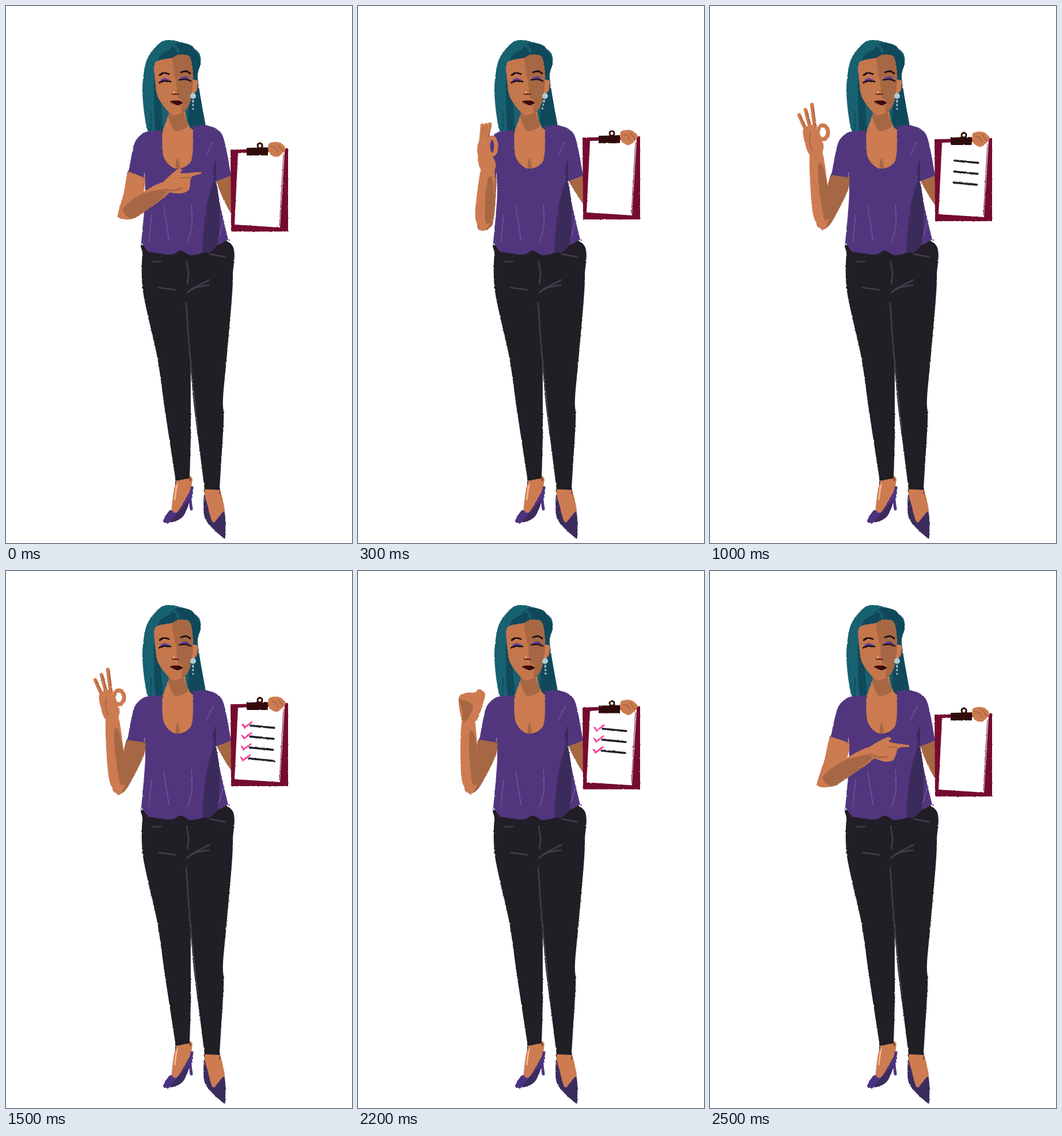
An HTML page that plays this animation: 601 px wide and 931 px high, repeating every 3 s.

```html
<!DOCTYPE html>
<html lang="en">
<head>
<meta charset="utf-8">
<title>Checklist</title>
<style>
html, body { margin: 0; width: 100%; height: 100%; overflow: hidden; background: #fff; }
svg { display: block; width: 100%; height: 100%; }
</style>
</head>
<body>
<svg viewBox="0 0 601 931" xmlns="http://www.w3.org/2000/svg">
  <defs>
    <filter id="crayon" filterUnits="userSpaceOnUse" x="0" y="0" width="601" height="931" color-interpolation-filters="sRGB">
      <feTurbulence type="fractalNoise" baseFrequency=".3" numOctaves="1" seed="4"/>
      <feDisplacementMap in="SourceGraphic" scale="2.6" xChannelSelector="R" yChannelSelector="G"/>
    </filter>
  </defs>
  <g id="figure" filter="url(#crayon)" stroke-linecap="round" stroke-linejoin="round"></g>
</svg>
<script>
const C = {
  skin: '#cd7b51', face: '#c4764c', shade: '#a66744', shirt: '#51367e', shirtDark: '#3b2b5b', fold: '#6d539f',
  jeans: '#211e25', seam: '#403e4a', hair: '#176170', hairDark: '#10495a', lips: '#3a0d0d', ink: '#1a1014',
  lid: '#5d3d9c', pearl: '#a8cdd6', board: '#750c30', clip: '#310b09', tick: '#f83b9c', line: '#20222a',
  shoe: '#4b3380', shoeDark: '#3c2c5d', glow: '#efb693'
};
const figure = document.getElementById('figure');

function add(parent, tag, attrs = {}) {
  const el = document.createElementNS('http://www.w3.org/2000/svg', tag);
  for (const k in attrs) el.setAttribute(k, attrs[k]);
  parent.appendChild(el);
  return el;
}

// Smooth curve through every given point
function curve(pts, closed) {
  const p = typeof pts === 'string' ? pts.trim().split(/\s+/).map(s => s.split(',').map(Number)) : pts;
  const n = p.length;
  const at = i => closed ? p[(i + n) % n] : p[Math.max(0, Math.min(n - 1, i))];
  const lean = (u, v, w, s) => [0, 1].map(k => (u[k] + s * (w[k] - v[k]) / 7).toFixed(1));
  let d = 'M' + p[0];
  for (let i = 0; i < (closed ? n : n - 1); i++) {
    const [a, b, c, e] = [at(i - 1), at(i), at(i + 1), at(i + 2)];
    d += 'C' + [lean(b, a, c, 1), lean(c, b, e, -1), c].join(' ');
  }
  return closed ? d + 'Z' : d;
}
const group = (g, x = 0, y = 0) => add(g, 'g', { transform: `translate(${x} ${y})` });
const shape = (g, pts, fill) => add(g, 'path', { d: curve(pts, true), fill });
const poly = (g, points, fill) => add(g, 'polygon', { points, fill });
const stroke = (g, pts, color, width) =>
  add(g, 'path', { d: curve(pts), fill: 'none', stroke: color, 'stroke-width': width });
const dot = (g, cx, cy, r, fill) => add(g, 'circle', { cx, cy, r, fill });
const ring = (g, cx, cy, rx, ry, color, width) =>
  add(g, 'ellipse', { cx, cy, rx, ry, fill: 'none', stroke: color, 'stroke-width': width });
const show = (el, on) => el.setAttribute('display', on ? 'inline' : 'none');

const clamp = (n, top = 1) => Math.max(0, Math.min(top, n));
const ease = p => p * p * (3 - 2 * p);
const mix = (a, b, p) => a + (b - a) * p;

function drawLegs(g) {
  shape(g, '297,820 323,817 317,851 306,873 288,878', C.skin);
  stroke(g, '297,828 293,855', C.glow, 3);
  stroke(g, '323,835 320,855 322,872', C.shoe, 5);
  shape(g, '325,833 308,884 283,896 273,893 285,874 298,877', C.shoe);
  shape(g, '318,858 308,884 286,895 297,879', C.shoeDark);
  shape(g, '345,836 370,837 380,882 362,897 349,870', C.skin);
  shape(g, '344,846 346,889 376,921 381,918 379,877 360,895 349,862', C.shoeDark);
  shape(g, `246,412 237,430 238,495 263,610 276,700 295,823 295,823 319,819 319,819 321,740 321,613
    325,680 337,775 345,838 345,838 371,839 371,839 378,720 377,680 386,580 394,470 384,408`, C.jeans);
  ['314,443 317,465 315,481', '264,488 294,492', '315,497 330,488 352,484', '320,492 353,475', '354,430 380,435',
    '254,444 269,443', '313,515 319,600 328,690 333,735'].forEach(p => stroke(g, p, C.seam, 2.6));
}

function drawChest(g) {
  shape(g, '273,165 268,245 276,280 298,288 322,280 329,240 319,165', C.skin);
  shape(g, '272,172 318,165 309,186 316,208 293,216 279,186', C.shade);
  shape(g, '298,263 302,281 294,281', C.shade);
}

function drawShirt(g) {
  shape(g, `246,219 271,215 271,215 274,262 295,282 322,268 325,208 325,208 350,207 376,224 391,294 391,294
    365,304 365,304 374,355 386,405 386,405 348,425 322,432 303,424 286,431 247,426 247,426 235,411 235,411
    242,320 237,235`, C.shirt);
  shape(g, '365,268 359,285 361,300 349,345 342,424 367,414 371,350 365,304', C.shirtDark);
  ['359,236 349,257', '253,362 248,408', '274,347 283,405', '322,345 323,378 316,408', '377,376 370,402']
    .forEach(p => stroke(g, p, C.fold, 1.6));
}

// turn: 0 faces the viewer, 1 looks aside
function drawHead(g, turn) {
  shape(g, `247,218 237,150 244,95 266,65 283,59 311,65 335,81 338,100 333,126 347,209 347,209 318,207 300,150
    272,217 272,217`, C.hair);
  shape(g, '297,64 324,70 338,97 333,126 347,209 347,209 318,207 318,100 283,82', C.hairDark);
  shape(g, '294,73 266,88 257,130 260,216 272,217 268,120 298,86', C.hairDark);
  stroke(g, '299,79 294,70 280,70 269,81', C.hair, 4);
  stroke(g, '252,186 251,216', C.hairDark, 1.5);
  const beads = group(g, turn * 4, turn * 2);
  const face = group(g, turn * 4, -turn);
  if (!turn) shape(face, '323,130 333,130 331,146 323,154', C.skin);
  shape(face, '260,97 290,90 318,87 325,125 318,172 298,188 285,186 264,158 258,120', C.face);
  shape(face, `${mix(290, 297, turn)},90 318,87 325,125 318,172 305,184 307,166 298,157 ${mix(296, 302, turn)},134`, C.shade);
  shape(face, '283,181 294,184 305,182 298,188', turn ? C.shade : C.skin);
  drawEye(group(face, 266, 118), 1);
  drawEye(group(face, 321, 115), -1);
  const middle = group(face, turn * 5, turn);
  stroke(middle, '289,153 300,153', '#5a2a1c', 2);
  dot(middle, 292, 150, 1.6, C.glow);
  shape(middle, '285,166 291,164 301,164 307,168 298,172', C.lips);
  const pendant = group(beads);
  if (!turn) dot(pendant, 325, 156, 5, C.pearl);
  for (let i = 0; i < 3; i++) stroke(pendant, `325,${164 + i * 7} 325,${166 + i * 6}`, C.pearl, 3.2);
  if (!turn) g.appendChild(beads);
  return pendant;
}

// Starts at the outer corner; side mirrors it
function drawEye(g, side) {
  const x = n => n * side;
  stroke(g, `${x(1)},2 ${x(8)},-2 ${x(17)},0`, C.ink, 2.8);
  shape(g, `${x(2)},12 ${x(9)},7 ${x(19)},11`, C.lid);
  stroke(g, `${x(0)},15 ${x(9)},12 ${x(20)},13`, C.ink, 2.6);
}

function drawBoard(g) {
  poly(g, '390,231 490,229 490,373 391,373', C.board);
  poly(g, '403,237 484,234 476,366 397,361', '#fff');
  stroke(g, '482,240 475,363', C.board, 1);
  stroke(g, '399,362 476,367', C.board, 1);
  poly(g, '418,228 455,227 455,241 418,241', C.clip);
  ring(g, 441, 224, 4, 4, C.clip, 3);
  shape(g, '456,222 464,218 476,219 486,230 471,244 457,237', C.skin);
  stroke(g, '461,226 468,228 473,236', C.shade, 2);
  stroke(g, '473,223 481,234', C.shade, 2);
  return [0, 1, 2, 3].map(i => {
    const row = group(g, -i, i * 19), line = group(row), tick = group(row);
    stroke(line, '425,268 466,272', C.line, 3.3);
    if (i === 3) dot(line, 469, 273, 1.8, C.line);
    stroke(tick, '411,266 415,271 415,271 427,262', C.tick, 2.8);
    return { line, tick };
  });
}

// Three fingers spread from base to tip
function fan(g, base, tip, baseStep, tipStep, width) {
  for (let i = 0; i < 3; i++) {
    const at = (p, d) => [p[0] + d[0] * i, p[1] + d[1] * i];
    const a = at(base, baseStep), b = at(tip, tipStep);
    stroke(g, [a, b], C.skin, width);
    stroke(g, [[a[0] + 2, a[1]], [b[0] + 2, b[1] + 3]], C.shade, 1.8);
  }
}

// Hands are drawn around the wrist
const drawHand = {
  point(g) {
    shape(g, '-6,-7 20,-31 28,-30 26,-24 58,-26 60,-23 44,-17 40,4 25,11 0,7', C.skin);
    stroke(g, '42,-17 25,-16', C.shade, 1.8);
    stroke(g, '-2,4 13,6 27,2', C.shade, 3);
  },
  side(g) {
    fan(g, [-13, -36], [-10, -70], [5, -4], [6.5, -1], 6.5);
    shape(g, '-19,-30 -12,-48 -1,-46 2,-26 12,-8 11,6 -13,6', C.skin);
    ring(g, 7, -34, 7, 15, C.skin, 7);
  },
  ok(g) {
    fan(g, [-17, -36], [-29, -63], [7.5, -3], [11, -9], 6.5);
    shape(g, '-22,-38 -4,-46 3,-28 13,-12 9,5 -11,5 -19,-14', C.skin);
    ring(g, 12, -33, 9, 12, C.skin, 7);
    stroke(g, '-10,-32 -11,-16 -7,-2', C.shade, 2);
  },
  fist(g) {
    shape(g, '-17,-35 -5,-45 10,-46 19,-52 29,-43 22,-15 12,5 -9,5', C.skin);
    shape(g, '-16,-34 8,-24 -1,0 -9,3 -10,-14', C.shade);
  }
};

drawLegs(group(figure));
drawChest(group(figure));
const headFront = group(figure), headAside = group(figure);
const pendant = drawHead(headFront, 0);
drawHead(headAside, 1);
const farArm = add(figure, 'path', { fill: C.shade });
drawShirt(group(figure));
const upperArm = add(figure, 'path');
const sleeve = add(figure, 'path', { fill: C.shirt });
const board = group(figure), rows = drawBoard(board);
const forearm = add(figure, 'path', { fill: C.skin });
const armShade = add(figure, 'path', { fill: C.shade });
const handBox = group(figure), hands = {};
for (const k in drawHand) drawHand[k](hands[k] = group(handBox));

// elbow, wrist, sleeve corner, hand turn
const START = { ex: 204, ey: 362, wx: 278, wy: 314, sx: 213, sy: 287, turn: 0 };
const SIDE = { ex: 217, ey: 380, wx: 226, wy: 277, sx: 222, sy: 291, turn: 0 };
const UP = { ex: 195, ey: 376, wx: 184, wy: 252, sx: 211, sy: 293, turn: 0 };
const END = { ...START, ex: 196, ey: 367, wx: 281, sx: 210, turn: 13 };

function blend(a, b, p) {
  const pose = {};
  for (const k in a) pose[k] = mix(a[k], b[k], p);
  return pose;
}

function drawArm({ ex, ey, wx, wy, sx, sy, turn }, hand) {
  const len = Math.hypot(wx - ex, wy - ey), ux = (wx - ex) / len, uy = (wy - ey) / len;
  // t runs from elbow to wrist, w goes across the arm
  const at = (t, w) => [ex + ux * len * t - uy * w, ey + uy * len * t + ux * w];
  const pointing = hand === 'point', low = pointing ? -13 : 0, end = pointing ? .97 : .8;
  const set = (el, pts) => el.setAttribute('d', curve(pts, true));
  set(forearm, [at(-.1, 0), at(.1, -14), at(.5, -15), at(1, -10), at(1.02, 10), at(.5, 15), at(.1, 14)]);
  set(armShade, [at(.06, low + 4), at(.5, low), at(end, 2), at(end, 9), at(.5, 15), at(.1, 14)]);
  set(upperArm, [[sx + 1, sy - 4], [239, 290], [240, 318], [ex + 17, ey - 2], at(-.09, 0), [ex - 10, ey],
    [(sx + ex) / 2 - 4, (sy + ey) / 2]]);
  upperArm.setAttribute('fill', pointing ? C.skin : C.shade);
  set(sleeve, [[249, 218], [(sx + 237) / 2, 234], [sx, sy], [sx, sy], [239, 297], [239, 297], [246, 260]]);
  for (const k in hands) show(hands[k], k === hand);
  handBox.setAttribute('transform', `translate(${wx} ${wy}) rotate(${turn})`);
}

function render(step) {
  const rise = clamp(step / 3), swing = clamp((step - 3) / 3), fall = clamp((step - 21.4) / 3.6);
  const lowering = step >= 22;
  const pose = lowering ? blend(UP, END, ease(fall)) : blend(blend(START, SIDE, ease(rise)), UP, ease(swing));
  const hand = lowering ? (fall < .6 ? 'fist' : 'point') : rise < .6 ? 'point' : swing < .3 ? 'side' : 'ok';
  drawArm(pose, hand);

  const drop = lowering ? mix(3, 18, fall) : mix(mix(18, -3, ease(rise)), 0, swing);
  board.setAttribute('transform', `translate(0 ${drop})`);
  farArm.setAttribute('d', `M364,300L391,288L394,${350 + drop * .8}Q376,${324 + drop * .8} 364,300Z`);
  pendant.setAttribute('transform', `rotate(${12 * Math.sin(Math.PI * (rise + swing) / 2) - 6 * Math.sin(Math.PI * fall)} 325 156)`);

  const aside = step === 20 || step === 21;
  show(headAside, aside);
  show(headFront, !aside);

  // Lines come first, then ticks; later they vanish from the bottom
  const left = clamp(25 - step, 4);
  rows.forEach((row, i) => {
    show(row.line, i < Math.min(left, step - 7));
    show(row.tick, i < Math.min(left, step - 11));
  });
}

let last = -1;
function loop(now) {
  const step = Math.floor(now % 3000 / 100);
  if (step !== last) render(last = step);
  requestAnimationFrame(loop);
}
render(0);
requestAnimationFrame(loop);
</script>
</body>
</html>
```
